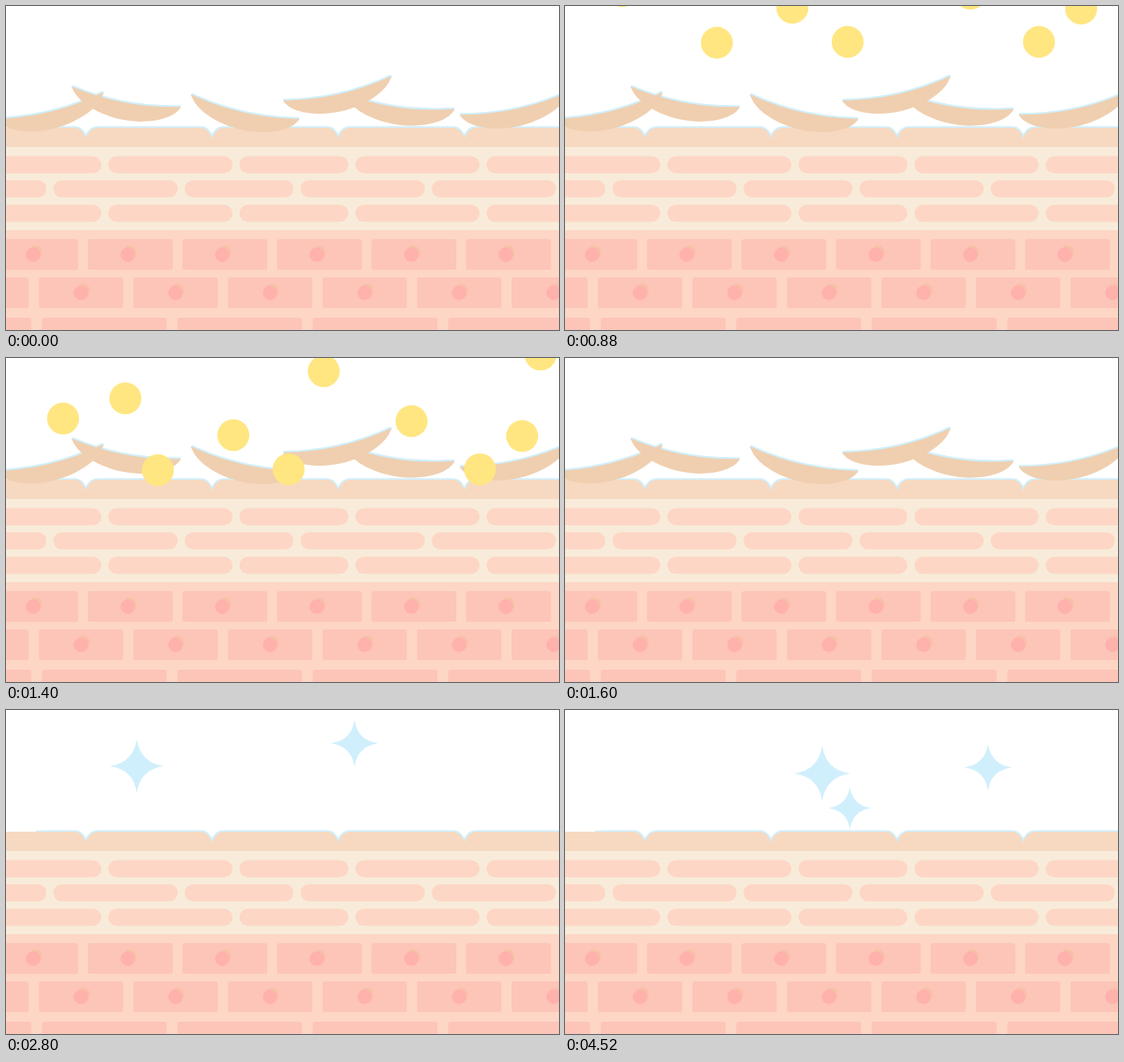
An HTML page for the animation above (4.76 s loop, 630x370 px).

```html
<!DOCTYPE html>
<html lang="en">
<head>
<meta charset="utf-8">
<title>Skin renewal</title>
<style>
html, body { margin: 0; height: 100%; overflow: hidden; background: #fff; }
svg { display: block; width: 630px; height: 370px; }
</style>
</head>
<body>
<svg id="stage" viewBox="0 0 630 370"></svg>
<script>
const WIDTH = 630, LOOP = 4760, STEP = 40, FALL_SPEED = 0.1656;
const BLUE = '#d0effc';

const rect = (x, y, w, h, r = 0) =>
  `<rect x="${x}" y="${y}" width="${w}" height="${h}" rx="${r}"/>`;
const circle = (x, y, r) => `<circle cx="${x}" cy="${y}" r="${r}"/>`;
const group = (attrs, items) => `<g ${attrs}>${items.join('')}</g>`;
const times = (n, make) => Array.from({ length: n }, (_, i) => make(i));

// Upper bricks: two long ones, then a short one
function slimRow(x, y) {
  let bricks = '';
  for (let i = 0; x < WIDTH; i++) {
    const w = i % 3 === 2 ? 124 : 141.5;
    bricks += rect(x, y, w, 19.5, 9.7);
    x += w + 8;
  }
  return bricks;
}

// Lower cells: evenly spaced blocks
const PITCH = 107.7;
const cellRow = (x, y, w, pitch) =>
  times(7, i => rect(x + pitch * i, y, w, 35, 2.5)).join('');
const nuclei = (dx, dy, r) =>
  times(6, i => circle(31 + PITCH * i + dx, 284 + dy, r) +
    circle(85.5 + PITCH * i + dx, 327.5 + dy, r));

// Surface with a notch between neighbouring cells
const surface = times(4, i => 91 + 143.7 * i).map(x =>
  `H${x - 13}Q${x - 4} 139 ${x} 151Q${x + 4} 139 ${x + 14} 139`).join('') + `H${WIDTH + 2}`;

// One flake shape, hung from its raised tip; side -1 mirrors it
const flakeTop = 'M0 0Q57 27 123 28';
const flakeUnder = 'C119 36 105 43 81 43C45 43 5 22 0 0Z';
const flakes = [
  [111, 98.5, -1, 1.2], [75, 92, 1, -2.2], [211, 101, 1, 0],
  [439, 80, -1, 0], [386, 100.5, 1, -5], [640.5, 98, -1, -0.8]
];
const flakePaths = d => flakes.map(([x, y, side, turn]) =>
  `<path transform="translate(${x} ${y}) scale(${side} 1) rotate(${turn})" d="${d}"/>`);

// Where the drops are at 880 ms
const drops = [[173, 42], [259, 2], [322, 41], [540, 41], [588, 3],
  [462, -14], [65, -17], [136, -40], [362, -71], [609, -90]];

function star(x, y, r) {
  const k = r * 0.12;
  return `<path transform="translate(${x} ${y})" d="M0 ${-r}Q${k} ${-k} ${r} 0Q${k} ${k} 0 ${r}Q${-k} ${k} ${-r} 0Q${-k} ${-k} 0 ${-r}Z"/>`;
}

const stage = document.getElementById('stage');
stage.innerHTML = [
  `<path d="M34 139.5L50 139${surface}" fill="none" stroke="${BLUE}" stroke-width="3.4"/>`,
  `<path d="M0 139${surface}V162H0Z" fill="#f7d9c1"/>`,
  group('fill="#f8ebd9"', [rect(0, 161, WIDTH, 95)]),
  group('fill="#fdd6c6"', [
    slimRow(-33, 171.5), slimRow(-95.5, 199), slimRow(-33, 227), rect(0, 256, WIDTH, 114)
  ]),
  group('fill="#fdc4b8"', [
    cellRow(-14.3, 266.3, 96.5, PITCH),
    cellRow(37.5 - PITCH, 310, 96, PITCH),
    cellRow(-113.4, 356, 142, 154.3)
  ]),
  group('fill="#f7c1a7"', nuclei(2.5, -3, 7.5)),
  group('fill="#ffb1ab"', nuclei(0, 0, 8.3)),
  group('id="flakes"', [
    group(`fill="none" stroke="${BLUE}" stroke-width="4"`, flakePaths(flakeTop)),
    group('fill="#efcfaf"', flakePaths(flakeTop + flakeUnder))
  ]),
  group('id="drops" fill="#ffe681"', drops.map(([x, y]) => circle(x, y, 18.2))),
  group(`id="sparkleA" fill="${BLUE}"`, [star(149, 64, 31), star(397, 38, 27)]),
  group(`id="sparkleB" fill="${BLUE}"`, [star(293, 72.5, 32), star(324.5, 112, 24.5), star(482, 65.5, 27)])
].join('');

const [flakeLayer, dropLayer, sparkleA, sparkleB] =
  ['flakes', 'drops', 'sparkleA', 'sparkleB'].map(id => document.getElementById(id));
const clamp = v => Math.max(0, Math.min(1, v));
const show = (layer, opacity) => layer.setAttribute('opacity', opacity);
const within = (t, from, to) => t >= from && t < to;

function draw(t) {
  show(flakeLayer, clamp(1 - (t - 2080) / 400));
  show(dropLayer, t < 560 ? 0 : clamp((1600 - t) / 200));
  dropLayer.setAttribute('transform', `translate(0 ${(t - 880) * FALL_SPEED})`);
  show(sparkleA, +(within(t, 2800, 3160) || within(t, 3800, 4480)));
  show(sparkleB, +(within(t, 3160, 3800) || t >= 4480));
}

const start = performance.now();
function tick() {
  const t = (performance.now() - start) % LOOP;
  draw(Math.floor(t / STEP) * STEP);
  requestAnimationFrame(tick);
}
tick();
</script>
</body>
</html>
```
